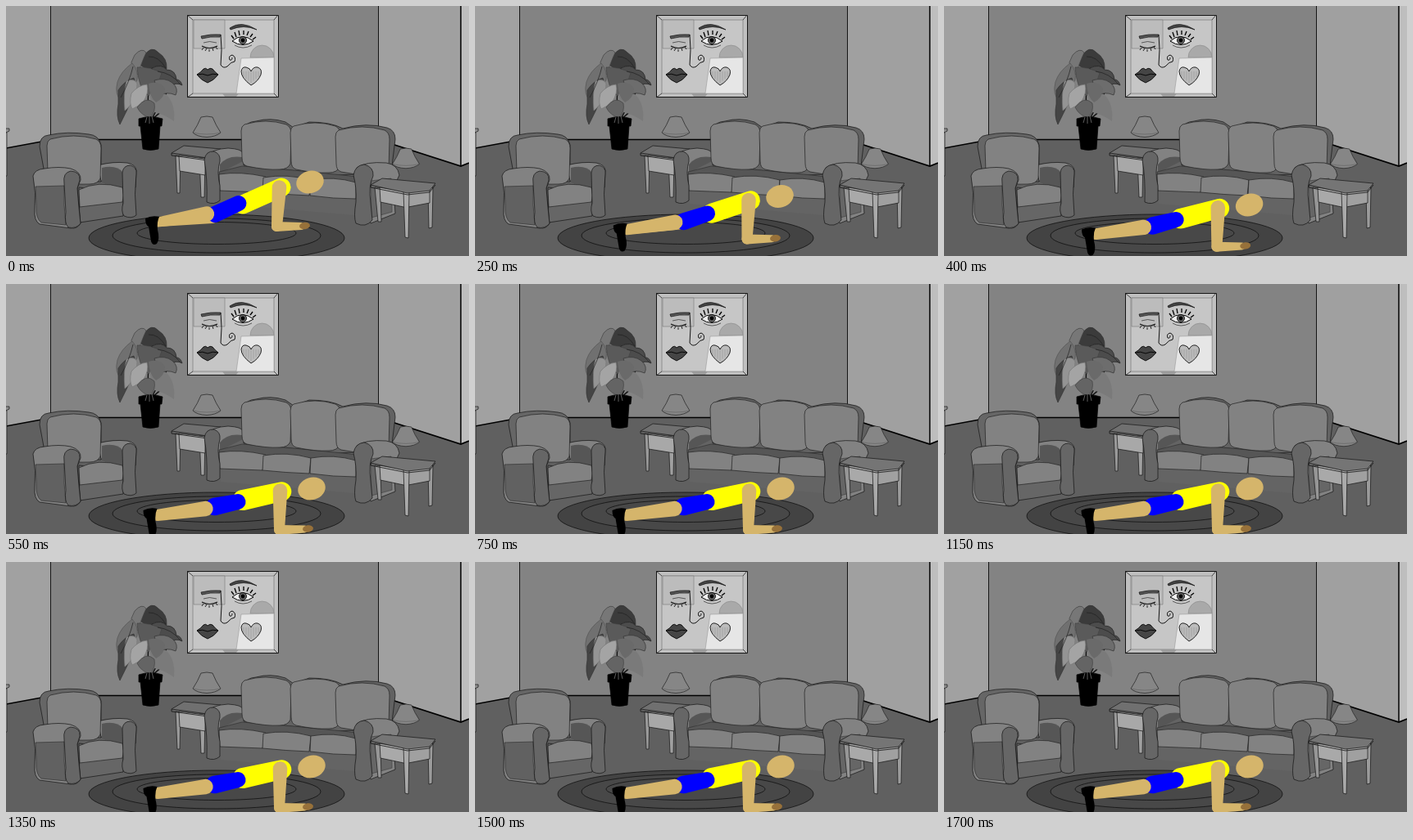
Recreate the animation shown at these times as an HTML page with a canvas. Size 565x306 px, loop 1.75 s.

```html
<!DOCTYPE html>
<html lang="en">
<head>
<meta charset="utf-8">
<title>Plank in the living room</title>
<style>
html, body { margin: 0; width: 100%; height: 100%; overflow: hidden; background: #606060; }
canvas { display: block; }
</style>
</head>
<body>
<canvas id="stage" width="565" height="306"></canvas>
<script>
const W = 565, H = 306, LOOP = 1750, STEP = 50, LOWERING = 500;
const SKIN = '#d5b56b', SHIRT = '#ffff00', SHORTS = '#0000ff', INK = '#151515';
const LIGHT = '#828282', MID = '#666', SHADE = '#565656';
const stage = document.getElementById('stage').getContext('2d');
const room = document.createElement('canvas');
room.width = W;
room.height = H;
let c = room.getContext('2d');

function shape(d, fill, stroke = INK, width = 0.7) {
  const p = new Path2D(d);
  if (fill) { c.fillStyle = fill; c.fill(p); }
  if (stroke) { c.strokeStyle = stroke; c.lineWidth = width; c.stroke(p); }
}
const line = (d, width = 0.8, color = INK) => shape(d, null, color, width);

function oval(x, y, rx, ry, fill, stroke, turn = 0) {
  c.beginPath();
  c.ellipse(x, y, rx, ry, turn, 0, Math.PI * 2);
  if (fill) { c.fillStyle = fill; c.fill(); }
  if (stroke) { c.strokeStyle = stroke; c.lineWidth = 0.8; c.stroke(); }
}

function drawWalls() {
  c.fillStyle = '#606060';
  c.fillRect(0, 0, W, H);
  shape('M54 0H454V163H54Z', '#838383', null);
  shape('M0 0H54V164L0 174Z', '#a1a1a1', null);
  shape('M454 0H555V196L454 163Z', '#a0a0a0', null);
  shape('M555 0H565V192L555 196Z', '#bebebe', null);
  line('M54.5 0V164M454.5 0V162', 1);
  line('M0 174L54 164', 1.3, '#000');
  line('M54 163.5H440', 1.3, '#000');
  line('M454 163.5L555 196L565 192', 1.8, '#000');
  line('M555 0V196', 1.5, '#000');
  shape('M-2 150H4V153L-2 156Z', '#8c8c8c');
  shape('M-2 155H1V208H-2Z', '#a6a6a6');
}

function drawPainting() {
  shape('M221.5 11.5H332.5V111.5H221.5Z', '#c0c0c0', INK, 1);
  shape('M228 17H327V107H228Z', '#c6c6c6', '#777');
  line('M221 11L228 17M332 11L327 17M221 112L228 107M332 112L327 107', 0.7);
  shape('M229 17H267V52H229Z', '#bcbcbc', '#777', 0.6);
  shape('M298 63A14.5 15 0 0 1 327 63Z', '#a9a9a9', '#888', 0.6);
  shape('M287 64L327 63V107H281Z', '#e6e6e6', '#999', 0.6);
  shape('M264 107L267 111H281L284 107Z', '#9b9b9b', null);

  shape('M238 37Q250 34 262 35L261 38Q249 37 239 40Z', '#555');
  line('M262 35Q264 54 262 72Q265 77 270 74Q275 68 279 68Q281 62 276 60Q271 61 273 66Q276 67 276 63', 1);
  shape('M273 27Q287 17 306 29Q290 22 274 29Z', '#444');

  line('M239 49Q248 54 258 49', 1.2);
  line('M241 51L239 54M245 52L243 55M248 53V56M252 52L253 55M256 50L258 53', 0.9);
  line('M241 45Q248 42 257 45', 0.6);

  shape('M276 43Q288 32 302 43Q289 52 276 43Z', '#eee', '#000', 1);
  oval(289, 42, 4.5, 4.5, '#666', '#000');
  oval(289, 42, 2.4, 2.4, '#000');
  line('M278 40L275 36M281 38L279 32M285 36L284 30M290 35V30M294 36L296 31M298 38L301 34M301 41L305 38', 1.3, '#000');
  line('M279 48Q289 54 300 48', 0.6);

  shape('M233 84Q238 81 241 77Q244 75 246 78Q249 75 252 77Q255 81 259 84Q254 91 246 94Q238 91 233 84Z', '#454545', '#000', 0.8);
  line('M233 84Q240 82 246 85Q252 82 259 84', 0.9, '#000');

  shape('M299 97Q287 88 287 80Q288 74 293 75Q298 76 299 80Q302 74 307 75Q313 77 311 84Q308 92 299 97Z', '#bcbcbc', '#222', 1);
  for (let i = 0; i < 7; i++) {
    const x = 290 + i * 3;
    line(`M${x} 80V${94 - Math.abs(x - 299) * 0.8}`, 0.5, '#888');
  }
}

function drawPlant() {
  line('M175 140Q170 105 180 66M176 138Q160 115 150 108M178 138Q190 115 200 100M179 138Q194 125 202 120', 1.5);
  shape('M168 62Q177 47 186 57Q197 64 196 77Q185 71 178 76Q170 77 165 73Z', '#3b3b3b', '#333');
  shape('M157 60Q166 50 171 57Q164 72 161 84Q154 78 153 69Z', '#777', '#444');
  shape('M178 76Q190 70 196 78Q207 78 208 90Q213 90 215 97Q208 93 200 98Q191 102 183 93Z', '#4c4c4c', '#222');
  shape('M154 70Q162 79 160 91Q151 104 141 117Q132 108 136 93Q140 80 154 70Z', '#707070', '#555');
  shape('M137 103Q145 91 156 88Q160 97 154 114Q147 129 139 145Q134 135 137 120Z', '#454545', '#333');
  shape('M160 75Q176 74 190 82Q185 100 174 110Q162 103 160 75Z', '#5a5a5a', '#444');
  shape('M147 92Q157 88 160 95Q160 110 152 121Q148 126 145 128Q143 108 147 92Z', '#949494', '#777');
  shape('M175 108Q187 98 198 111Q207 122 205 141Q194 133 181 130Z', '#7a7a7a', null);
  shape('M181 91Q194 87 203 94Q211 101 207 109Q196 104 186 110Z', '#6d6d6d', '#333');
  shape('M174 95Q187 91 194 101Q194 112 183 118Q175 112 174 95Z', '#6a6a6a', null);
  shape('M153 107Q161 97 172 96Q175 106 167 118Q159 124 154 126Q150 119 153 107Z', '#a4a4a4', '#777');
  shape('M160 124Q171 109 181 119Q183 129 176 137Q165 134 160 124Z', '#646464', '#444');
  line('M174 62Q186 61 195 76M185 80Q202 82 213 96M155 74Q151 92 140 112', 0.7, '#202020');
  shape('M162 138Q176 133 191 138L190 147H188L186 175Q176 178 167 175L164 147H162Z', '#000', '#000');
  line('M170 143L172 136M175 144V135M180 143L178 135', 0.8, '#777');
}

function drawLamp(x, y, k) {
  c.save();
  c.translate(x, y);
  c.scale(k, k);
  shape('M-7 0Q0 -2 7 0Q11 10 17 19Q11 24 0 24.5Q-12 24 -17 19Q-11 10 -7 0Z', '#868686', '#222');
  line('M-17 19Q0 23 17 19', 0.5, '#555');
  c.restore();
}

function drawLeftTable() {
  shape('M207 183L213 184L212 229H209Z', '#9a9a9a');
  shape('M236 186H243L242 234H238Z', '#a0a0a0');
  shape('M211 183L243 187V207L212 202Z', '#a8a8a8');
  shape('M202 180L217 171L262 175L246 186Z', '#707070');
  line('M202 180V183L246 189', 0.8);
}

function drawRightTable() {
  shape('M450 222L457 223L458 264H454Z', '#969696');
  shape('M515 224L521 222L520 271L516 272Z', '#9c9c9c');
  shape('M456 222L490 228V247L457 240Z', '#a9a9a9');
  shape('M490 228L517 224V241L491 246Z', '#a0a0a0');
  shape('M485 227L492 228L491 284L487 283Z', '#aaa');
  shape('M445 219L459 211L524 217L517 226L490 229Z', '#757575');
  line('M445 219V222L490 231L517 228L524 219', 0.8);
}

function cushion(x, y, w, h) {
  shape(`M${x + 4} ${y + 4}Q${x + w / 2} ${y - 4} ${x + w - 6} ${y + 4}` +
    `Q${x + w} ${y + 7} ${x + w} ${y + 15}L${x + w - 1} ${y + h - 7}` +
    `Q${x + w - 4} ${y + h} ${x + w - 14} ${y + h}Q${x + w / 2} ${y + h + 1} ${x + 7} ${y + h - 4}` +
    `Q${x + 1} ${y + h - 6} ${x + 1} ${y + h - 14}L${x} ${y + 12}Q${x} ${y + 6} ${x + 4} ${y + 4}Z`,
    LIGHT, '#222');
}

function drawArmchair() {
  shape('M46 199L41 172Q41 159 52 158Q75 153 101 157Q113 158 116 170L116 215H50Z', MID);
  shape('M112 195Q130 190 148 192Q158 194 159 201L158 222L143 228L116 214Z', LIGHT);
  shape('M117 198Q135 194 143 204V226L117 216Z', SHADE, null);
  shape('M89 222L143 228V257L90 265Z', MID);
  shape('M89 225Q112 213 142 222Q145 232 142 240Q115 243 90 246Z', LIGHT, '#222');
  cushion(50, 159, 66, 59);
  shape('M142 204Q143 195 152 195Q160 198 159 205Q156 230 159 256Q153 261 144 257Q140 251 143 241Z', MID);
  shape('M33 208Q35 200 47 199Q65 196 79 199Q92 203 91 213L87 223Q89 249 91 266Q87 273 79 272L41 267Q34 263 35 249Q37 229 33 208Z', LIGHT);
  shape('M36 221L71 220Q70 243 73 268L43 265Q36 260 37 244Z', '#616161', '#333');
  shape('M71 217Q69 204 79 202Q91 203 90 213L87 223Q89 249 91 266Q86 273 76 271Q71 266 73 252Z', MID);
}

function drawSofa() {
  shape('M245 184Q251 175 271 174Q288 175 289 180V203L260 210Z', LIGHT);
  shape('M261 204V194Q270 182 289 185V200Z', SHADE, null);
  shape('M258 206L289 190L430 204L425 256L262 242Z', '#646464', null);
  shape('M290 150Q293 142 305 141Q323 136 341 142L351 149L370 142Q397 142 411 150Q440 142 465 149Q475 152 475 163L470 204L405 207L290 195Z', '#626262');
  shape('M260 203L288 196L350 201L411 207L435 210L426 220L262 216Z', SHADE, '#333');
  shape('M260 206Q286 202 317 209L313 228Q286 227 261 226Z', LIGHT, '#222');
  shape('M314 210Q343 205 372 213L370 232Q342 231 313 228Z', LIGHT, '#222');
  shape('M372 213Q400 208 427 216V236Q400 236 371 232Z', LIGHT, '#222');
  cushion(287, 141, 61, 59);
  cushion(347, 143, 61, 61);
  cushion(402, 148, 66, 59);
  shape('M242 188Q244 177 254 178Q262 181 261 190Q257 203 261 220V238Q254 244 245 240Q246 212 242 188Z', MID);
  shape('M428 198Q439 190 464 192Q478 194 480 207L473 222L475 254L445 266Z', LIGHT);
  shape('M445 214L470 211L471 252L446 259Z', MID, '#444');
  shape('M424 207Q426 195 437 194Q449 197 448 208Q442 220 445 241L447 262Q439 272 427 266Q424 258 427 240Q428 222 424 207Z', MID);
}

function drawRug() {
  oval(257, 284, 156, 29, '#434343', '#111');
  oval(257, 281, 127, 21, '#484848', '#111');
  oval(257, 278, 97, 13.5, '#484848', '#111');
}

function drawRoom() {
  drawWalls();
  drawPainting();
  drawPlant();
  drawLamp(245, 136, 1);
  drawLeftTable();
  drawLamp(488, 175, 0.97);
  drawSofa();
  drawRightTable();
  drawArmchair();
  drawRug();
}

// Tapered limb: the hull of two circles, each given as [x, y, radius].
function limb([x1, y1, r1], [x2, y2, r2], color) {
  const a = Math.atan2(y2 - y1, x2 - x1);
  const off = Math.acos((r1 - r2) / Math.hypot(x2 - x1, y2 - y1));
  c.beginPath();
  c.arc(x1, y1, r1, a + off, a - off + Math.PI * 2);
  c.arc(x2, y2, r2, a - off, a + off);
  c.closePath();
  c.fillStyle = color;
  c.fill();
}

function drawPerson(k) {
  const mix = (high, low) => high.map((v, i) => v + (low[i] - v) * k);

  limb(mix([252, 260, 6], [246, 275, 6]), mix([188, 265, 5], [186, 284, 5]), SKIN);
  limb(mix([336, 222, 11.5], [336.5, 254, 11.8]), mix([289, 243, 11.5], [289, 264.5, 12.5]), SHIRT);
  limb(mix([284, 241.5, 9.5], [283, 266.5, 9.5]), mix([255, 255, 10], [254.5, 272.5, 10.8]), SHORTS);
  limb(mix([245, 254.5, 9.2], [243.5, 275, 9.2]), mix([185, 264.5, 6], [185, 283, 7]), SKIN);

  const [fx, fy] = mix([0, 0], [-2.5, 17]);
  c.save();
  c.translate(fx, fy);
  shape('M170 260Q178 256 187 258Q184 264 185 274Q188 285 184 291Q179 294 177 288L174 270Q170 268 170 260Z', '#000', null);
  c.restore();

  const [handX, handY] = mix([364.5, 269], [368.5, 299.5]);
  limb(mix([330, 270, 6], [333, 301, 6]), mix([360, 269.5, 4.5], [364, 300, 4.5]), SKIN);
  oval(handX, handY, 6.5, 4.2, '#97713a', null, -0.15);
  limb(mix([333.5, 222, 8.8], [334.5, 253, 8.8]), mix([330.5, 269.5, 6.5], [333.5, 300.5, 6.5]), SKIN);

  const [headX, headY] = mix([371, 215.5], [373, 250.5]);
  oval(headX, headY, 17, 13.6, SKIN, null, -0.3);
}

drawRoom();
c = stage;

function frame(now) {
  const t = Math.floor((now % LOOP) / STEP) * STEP;
  c.drawImage(room, 0, 0);
  drawPerson(Math.min(1, t / LOWERING));
  requestAnimationFrame(frame);
}
frame(0);
</script>
</body>
</html>
```
